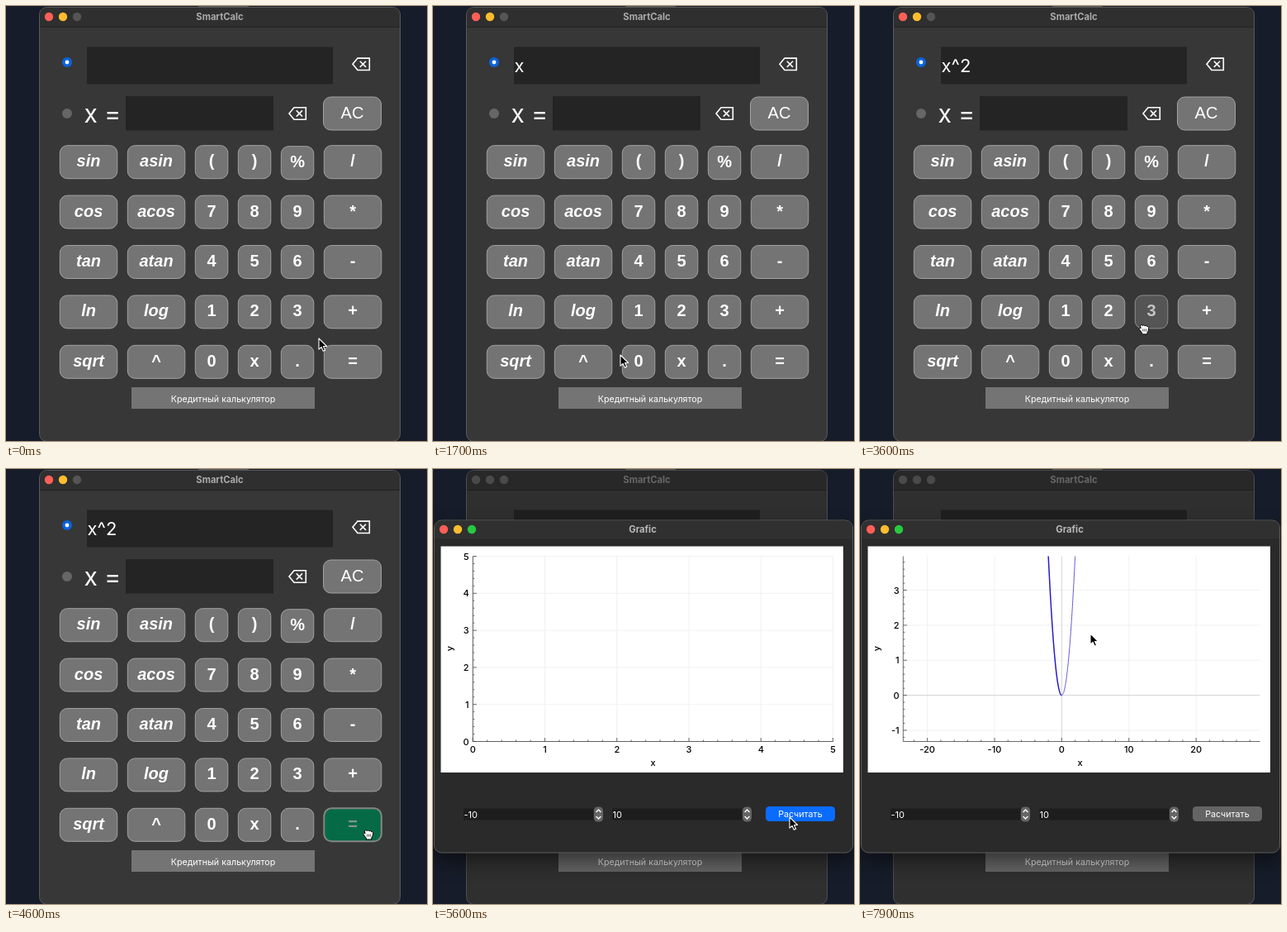
Write an HTML page that moves like this. It is 510 px wide and 526 px high and loops after 8 s.

```html
<!DOCTYPE html>
<html lang="ru">
<head>
<meta charset="utf-8">
<style>
  html, body { margin: 0; width: 100%; height: 100%; overflow: hidden; background: #161c29; }
  svg { display: block; width: 510px; height: 526px; font-family: Inter, "Open Sans", sans-serif; }
  .key text { font: bold 20px "Liberation Sans", Arial, sans-serif; fill: #fff; text-anchor: middle; }
  .key .fn { font-style: italic; }
  .key .plain { font-weight: normal; }
  .key rect { fill: #747474; stroke: #a2a2a2; }
  .key.hover rect { fill: #555; stroke: #8e8e8e; }
  .key.hover text { fill: #c4c4c4; }
  .key.eq.hover rect { fill: #056b47; stroke: #858585; stroke-width: 2; }
  .key.eq.hover text { fill: #86958d; }
  .title { font-size: 11.2px; font-weight: 700; text-anchor: middle; }
  .small { font-size: 10.7px; fill: #fff; text-anchor: middle; }
  .tick { font-size: 11px; font-weight: 500; fill: #000; }
</style>
</head>
<body>
<svg id="stage" viewBox="0 0 510 526">
  <defs>
    <filter id="blur" x="-20%" y="-20%" width="140%" height="140%"><feGaussianBlur stdDeviation="13"/></filter>
    <clipPath id="plotClip"><rect x="40" y="105.5" width="444.5" height="224"/></clipPath>
  </defs>
  <rect width="510" height="526" fill="#161c29"/>
  <rect x="233" y="-3" width="61" height="5" rx="2" fill="#555"/>
  <g id="calc"></g>
  <g id="dialog"></g>
  <g id="arrow">
    <path d="M0 0V13.2L3.1 10.4L5.3 15.3L7.6 14.3L5.5 9.5H9.6Z" fill="#000" stroke="#fff" stroke-width="1.1" stroke-linejoin="round"/>
  </g>
  <g id="hand">
    <path d="M-2.5 1C-2.5-1 0-1 .2.8C.8-.6 2.8-.4 3 1.1C4-.1 5.5.4 5.6 1.8C6.8 1.2 7.7 2 7.6 3.4C7.5 6 6.8 7.5 5.8 9V11H-.6V9.4C-1.6 7.8-3.2 6.4-4 4.8C-4.4 3.6-3 3-2 4Z" fill="#fff" stroke="#000" stroke-linejoin="round"/>
    <path d="M.6 4.5V7.6M2.6 4.5V7.6M4.6 4.5V7.6" stroke="#000" stroke-width=".7"/>
  </g>
</svg>
<script>
const LOOP = 8000, STEP = 100;
const OPEN = 4700, PRESS = 5600, PLOT = 5800;
const $ = id => document.getElementById(id);
const rect = (x, y, w, h, fill, more = '') =>
  `<rect x="${x}" y="${y}" width="${w}" height="${h}" fill="${fill}" ${more}/>`;
const label = (x, y, s, cls, more = '') => `<text x="${x}" y="${y}" class="${cls}" ${more}>${s}</text>`;
const line = (x1, y1, x2, y2) => `M${x1.toFixed(2)} ${y1.toFixed(2)}L${x2.toFixed(2)} ${y2.toFixed(2)}`;
const lights = (x, y, colors) =>
  colors.map((c, i) => `<circle cx="${x + i * 17}" cy="${y}" r="5.2" fill="${c}"/>`).join('');

// Calculator window
const COLS = [[65, 70], [147, 70], [229, 40], [281, 40], [333, 40], [385, 70]];
const ROWS = ['sin asin ( ) % /', 'cos acos 7 8 9 *', 'tan atan 4 5 6 -', 'ln log 1 2 3 +', 'sqrt ^ 0 x . ='];
const keys = [];

function addKey(x, y, w, text, cls) {
  const id = 'key' + keys.length;
  keys.push({ id, x, y, w });
  return `<g class="key${text === '=' ? ' eq' : ''}" id="${id}">` +
    rect(x, y, w, 40, '', 'rx="9"') + label(x + w / 2, y + 25.5, text, cls) + '</g>';
}

function eraser(x, y) {
  return `<path transform="translate(${x} ${y})" d="M-10 0L-4-7.2H10.3V7.2H-4ZM-1.2-3.6L6 3.6M6-3.6L-1.2 3.6" fill="none" stroke="#fff" stroke-width="1.6"/>`;
}

function buildCalc() {
  let s = rect(40.5, 1.5, 437, 525, '#373737', 'rx="9" stroke="#5a5a5a"') +
    '<path d="M41 25V11Q41 2 50 2H468Q477 2 477 11V25Z" fill="#2f2f2f"/>' +
    '<path d="M41 25.5H477" stroke="#222"/>' +
    '<g id="calcLights"></g>' + label(259, 16.5, 'SmartCalc', 'title', 'id="calcTitle"') +
    '<circle cx="74" cy="68" r="6" fill="#0b62dc"/><circle cx="74" cy="68" r="2.4" fill="#fff"/>' +
    '<circle cx="74" cy="130" r="6" fill="#666"/>' +
    rect(98, 49.5, 298, 45, '#242424') + rect(145, 109, 179, 41.5, '#242424') +
    label(98.5, 80, '', '', 'id="entry" font-size="22" fill="#fff"') +
    label(94.5, 141, 'x =', '', 'font-size="30" fill="#fff"') +
    eraser(430, 70.3) + eraser(353, 130) +
    addKey(384.5, 110, 70, 'AC', 'plain');
  ROWS.forEach((row, r) => row.split(' ').forEach((text, c) => {
    const [x, w] = COLS[c];
    s += addKey(x + .3, 168.7 + r * 60.4 + (text === '%' ? 1 : 0), w - .5, text, /[a-z]{2}/.test(text) ? 'fn' : '');
  }));
  s += rect(152, 461, 222, 26, '#747474') + label(263, 478.8, 'Кредитный калькулятор', 'small');
  $('calc').innerHTML = s;
}

// Graph window
function spinBox(x, value) {
  return rect(x, 410.5, 157, 14, '#1d1d1d') + label(x + .5, 421.8, value, '', 'font-size="11" fill="#fff"') +
    rect(x + 158, 408.5, 11, 18, '#656565', 'rx="4.5"') +
    `<path d="M${x + 160.6} 415l2.9-3l2.9 3M${x + 160.6} 420l2.9 3l2.9-3" fill="none" stroke="#fff" stroke-width="1.3"/>`;
}

function buildDialog() {
  $('dialog').innerHTML =
    rect(40, 1, 438, 525, '#000', 'opacity=".14" rx="9"') +
    rect(0, 76, 510, 396, '#000', 'rx="10" opacity=".55" filter="url(#blur)"') +
    rect(1.5, 62, 507, 402, '#2a2a2a', 'rx="9" stroke="#5c5c5c"') +
    '<path d="M2 84V71Q2 62.5 11 62.5H499Q508 62.5 508 71V84Z" fill="#303030"/>' +
    lights(13, 73, ['#ff5f57', '#febc2e', '#28c840']) +
    label(254, 76.8, 'Grafic', 'title', 'fill="#b9b9b9"') +
    rect(9.5, 93.5, 487.5, 273.5, '#fff') + '<g id="plot"></g>' +
    label(266.5, 359, 'x', 'tick', 'text-anchor="middle"') +
    label(0, 0, 'y', 'tick', 'text-anchor="middle" transform="translate(24 217) rotate(-90)"') +
    spinBox(37, '-10') + spinBox(217, '10') +
    rect(403, 408, 84, 18, '#646464', 'rx="4.5" id="solve"') + label(445, 420.6, 'Расчитать', 'small');
}

// Plot: a range is [xMin, xMax, yMin, yMax]
const TOP = 105.5, BOTTOM = 329.5, RIGHT = 484.5;
const EMPTY = [0, 5, 0, 5], FRESH = [-10, 10, -1, 1], DRAGGED = [-10.16, 9.86, -.138, 1.857],
  ZOOMED = [-34.5, 18.6, -3.07, 2.22], LAST = [-23.6, 29.5, -1.32, 3.97];
const mix = (a, b, p) => a.map((v, i) => v + (b[i] - v) * p);
const part = (t, a, b) => Math.min(1, Math.max(0, (t - a) / (b - a)));

function rangeAt(t) {
  if (t < PLOT) return EMPTY;
  if (t <= 7000) return mix(FRESH, DRAGGED, part(t, 6600, 6900));
  if (t <= 7500) {
    const grow = n => .85 ** -n - 1;
    return mix(DRAGGED, ZOOMED, grow(6 * part(t, 7200, 7500)) / grow(6));
  }
  return mix(ZOOMED, LAST, part(t, 7500, 7900));
}

function ticks(min, max) {
  const raw = (max - min) / 5, mag = 10 ** Math.floor(Math.log10(raw)), m = raw / mag;
  const nice = [1, 2, 2.5, 5, 10].reduce((a, b) => Math.abs(b - m) < Math.abs(a - m) ? b : a);
  const sub = nice * mag / 5, out = [];
  for (let i = Math.ceil(min / sub - 1e-6); i <= max / sub + 1e-6; i++)
    out.push({ v: i * sub, major: i % 5 === 0, text: String(+(i * sub).toFixed(2)) });
  return out;
}

const textWidth = s => [...s].reduce((w, c) => w + (c === '-' ? 4 : c === '.' ? 2.5 : 6.8), 0);

function drawPlot(t) {
  const [x0, x1, y0, y1] = rangeAt(t);
  const xs = ticks(x0, x1), ys = ticks(y0, y1);
  const left = 41.5 + Math.max(...ys.filter(k => k.major).map(k => textWidth(k.text)));
  const px = v => left + (v - x0) / (x1 - x0) * (RIGHT - left);
  const py = v => BOTTOM - (v - y0) / (y1 - y0) * (BOTTOM - TOP);
  let grid = '', zero = '', marks = line(left, TOP, left, BOTTOM) + line(left, BOTTOM, RIGHT, BOTTOM), text = '';
  for (const k of xs) {
    const x = px(k.v);
    marks += line(x, BOTTOM, x, BOTTOM - (k.major ? 4.5 : 2));
    if (!k.major) continue;
    const g = line(x, TOP, x, BOTTOM);
    if (k.text === '0') zero += g; else grid += g;
    text += label(x, 342.5, k.text, 'tick', 'text-anchor="middle"');
  }
  for (const k of ys) {
    const y = py(k.v);
    marks += line(left, y, left + (k.major ? 4.5 : 2), y);
    if (!k.major) continue;
    const g = line(left, y, RIGHT, y);
    if (k.text === '0') zero += g; else grid += g;
    text += label(left - 4.7, y + 4, k.text, 'tick', 'text-anchor="end"');
  }
  const stroke = (d, color, w, more = '') =>
    `<path d="${d}" fill="none" stroke="${color}" stroke-width="${w}" ${more}/>`;
  const half = sign => {
    let d = '';
    for (let i = 0; i <= 100; i++) {
      const x = sign * i * .03;
      d += (i ? 'L' : 'M') + px(x).toFixed(2) + ' ' + py(x * x).toFixed(2);
    }
    return d;
  };
  let s = stroke(grid, '#f1f1f1', 1) + stroke(zero, '#d4d4d4', 1) + stroke(marks, '#444', .8) + text;
  if (t >= PLOT)
    s += stroke(half(-1), '#2a1cc4', 1.5, 'clip-path="url(#plotClip)"') +
      stroke(half(1), '#3d33d0', .8, 'clip-path="url(#plotClip)"');
  $('plot').innerHTML = s;
}

// Pointer: time, x, y
const PATH = [[0, 379, 402], [600, 305, 432], [900, 305, 432], [1700, 227, 422], [1800, 205, 428],
  [2100, 205, 428], [2800, 309, 368], [3300, 309, 368], [4200, 437, 437], [4700, 437, 437],
  [5400, 432, 421], [5700, 432, 421], [6500, 335, 187], [6600, 335, 187], [6900, 338, 278],
  [7000, 338, 278], [7200, 368, 130], [7500, 368, 130], [7900, 279, 199]];

function pointerAt(t) {
  const i = PATH.findIndex(k => k[0] >= t);
  if (i < 1) return PATH[0].slice(1);
  const [a, b] = [PATH[i - 1], PATH[i]];
  const p = part(t, a[0], b[0]);
  return mix(a, b, p * p * (3 - 2 * p)).slice(1);
}

const entryAt = t => t >= 3000 ? 'x^2' : t >= 2100 ? 'x^' : t >= 800 ? 'x' : '';

function render(t) {
  const open = t >= OPEN, [x, y] = pointerAt(t);
  let over = false;
  for (const k of keys) {
    const hit = !open && x >= k.x && x <= k.x + k.w && y >= k.y && y <= k.y + 40;
    over = over || hit;
    $(k.id).classList.toggle('hover', hit);
  }
  $('entry').textContent = entryAt(t);
  $('calcLights').innerHTML = lights(52, 13, open ? ['#565656', '#565656', '#565656'] : ['#ff5f57', '#febc2e', '#555']);
  $('calcTitle').setAttribute('fill', open ? '#777' : '#ababab');
  $('dialog').style.display = open ? '' : 'none';
  if (open) {
    drawPlot(t);
    $('solve').setAttribute('fill', t >= PRESS && t < PLOT ? '#0a6cff' : '#646464');
  }
  for (const [id, on] of [['arrow', !over], ['hand', over]]) {
    $(id).style.display = on ? '' : 'none';
    $(id).setAttribute('transform', `translate(${x.toFixed(2)} ${y.toFixed(2)})`);
  }
}

buildCalc();
buildDialog();
const start = performance.now();
let shown = -1;
function tick() {
  const t = Math.floor((performance.now() - start) % LOOP / STEP) * STEP;
  if (t !== shown) render(shown = t);
  requestAnimationFrame(tick);
}
tick();
</script>
</body>
</html>
```
